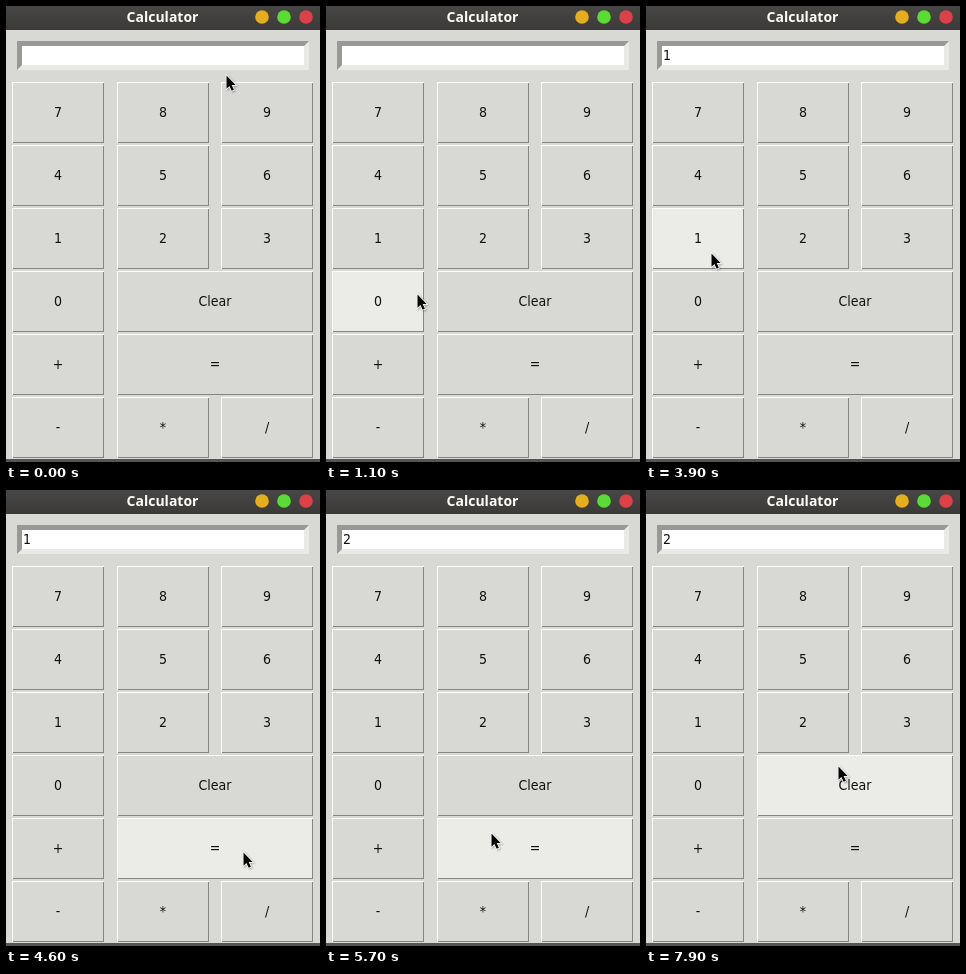
These frames come from a looping animation (314 px wide and 456 px high, 8 s). An HTML page with a canvas:

```html
<!DOCTYPE html>
<html lang="en">
<head>
<meta charset="utf-8">
<title>Calculator</title>
<style>
  html, body { margin: 0; width: 100%; height: 100%; overflow: hidden; background: #d8d8d5; }
  canvas { display: block; }
</style>
</head>
<body>
<canvas id="stage" width="314" height="456"></canvas>
<script>
const ctx = document.getElementById('stage').getContext('2d');
const LOOP = 8000, STEP = 100;
const FACE = '#d8d8d5', ACTIVE = '#ebebe7', LIGHT = '#fdfdfc', SHADE = '#858583', INK = '#111';
const UI_FONT = '14px "DejaVu Sans Condensed", "Noto Sans", sans-serif';

const columns = [6, 111, 215];
const rows = [['7', '8', '9'], ['4', '5', '6'], ['1', '2', '3'], ['0', 'Clear'], ['+', '='], ['-', '*', '/']];
const buttons = rows.flatMap((labels, row) => labels.map((label, col) => ({
  label,
  x: columns[col],
  y: 76 + 63 * row,
  w: labels.length === 2 && col === 1 ? 196 : 92,
  h: 61
})));

// Each move glides the pointer to (x, y); some end with a click that sets the entry.
const home = { x: 220, y: 69 };
const moves = [
  { from: 0, to: 1000, x: 91, y: 288 },
  { from: 1100, to: 1600, x: 55, y: 240, press: 1800, release: 2000, entry: '1' },
  { from: 2100, to: 2500, x: 55, y: 366, press: 2600, release: 2800, entry: '' },
  { from: 2900, to: 3200, x: 55, y: 240, press: 3500, release: 3700, entry: '1' },
  { from: 3800, to: 4500, x: 237, y: 362, press: 4700, release: 4900, entry: '2' },
  { from: 5000, to: 5700, x: 165, y: 343 },
  { from: 5700, to: 6200, x: 57, y: 416, press: 6300, release: 6500, entry: '' },
  { from: 6500, to: 6900, x: 138, y: 226 },
  { from: 6900, to: 7000, x: 102, y: 194 },
  { from: 7000, to: 7300, x: 150, y: 232, press: 7400, release: 7500, entry: '2' },
  { from: 7600, to: 7850, x: 192, y: 276 }
];

function pointerAt(t) {
  let { x, y } = home;
  for (const move of moves) {
    const k = Math.min(1, Math.max(0, (t - move.from) / (move.to - move.from)));
    const eased = k * k * (3 - 2 * k);
    x += (move.x - x) * eased;
    y += (move.y - y) * eased;
  }
  return { x: Math.round(x), y: Math.round(y) };
}

function buttonAt(p) {
  return buttons.find(({ x, y, w, h }) => p.x >= x && p.x < x + w && p.y >= y && p.y < y + h);
}

function rect(color, x, y, w, h) {
  ctx.fillStyle = color;
  ctx.fillRect(x, y, w, h);
}

function trace(points) {
  ctx.beginPath();
  points.forEach(([x, y]) => ctx.lineTo(x, y));
  ctx.closePath();
}

function text(str, x, y, font, color, align) {
  ctx.font = font;
  ctx.textAlign = align;
  ctx.fillStyle = color;
  ctx.fillText(str, x, y);
}

function drawTitleBar() {
  const shade = ctx.createLinearGradient(0, 0, 0, 24);
  shade.addColorStop(0, '#484745');
  shade.addColorStop(1, '#3b3a38');
  rect(shade, 0, 0, 314, 24);
  text('Calculator', 156.5, 16, 'bold 14px "Noto Sans", sans-serif', '#fbfbf8', 'center');
  ['#e5ad20', '#5bdc35', '#da4148'].forEach((color, i) => {
    ctx.fillStyle = color;
    ctx.beginPath();
    ctx.arc(256 + 22 * i, 11, 6.8, 0, 2 * Math.PI);
    ctx.fill();
  });
}

function drawEntry(value) {
  rect('#e9e9e6', 11, 35, 292, 29);
  trace([[11, 35], [303, 35], [298, 40], [16, 40], [16, 59], [11, 64]]);
  ctx.fillStyle = '#989896';
  ctx.fill();
  rect('#fff', 16, 40, 282, 19);
  text(value, 17, 54, UI_FONT, INK, 'left');
}

function drawButton({ label, x, y, w, h }, active, pressed) {
  rect(pressed ? SHADE : LIGHT, x, y, w, h);
  rect(pressed ? LIGHT : SHADE, x + 1, y + 1, w - 1, h - 1);
  rect(active ? ACTIVE : FACE, x + 1, y + 1, w - 2, h - 2);
  const shift = pressed ? 2 : 0;
  text(label, x + w / 2 + shift, y + 35 + shift, UI_FONT, INK, 'center');
}

function drawPointer({ x, y }) {
  ctx.save();
  ctx.translate(x + 0.5, y + 0.5);
  ctx.scale(0.86, 0.88);
  trace([[0, 0], [0, 15], [3.4, 11.8], [6, 17.4], [8.6, 16.2], [6, 10.8], [10.6, 10.8]]);
  ctx.lineWidth = 1.8;
  ctx.strokeStyle = '#fff';
  ctx.shadowColor = 'rgba(0,0,0,.3)';
  ctx.shadowBlur = 2;
  ctx.shadowOffsetX = ctx.shadowOffsetY = 1;
  ctx.stroke();
  ctx.shadowColor = 'transparent';
  ctx.fillStyle = '#050505';
  ctx.fill();
  ctx.restore();
}

function draw(now) {
  const t = Math.floor((now % LOOP) / STEP) * STEP;
  // Highlighting trails the pointer by one step.
  const hovered = buttonAt(pointerAt(t - STEP));
  const pressed = moves.some(m => t >= m.press && t < m.release);
  const lastClick = moves.filter(m => m.release <= t).pop();

  rect(FACE, 0, 0, 314, 456);
  drawTitleBar();
  drawEntry(lastClick ? lastClick.entry : '');
  buttons.forEach(b => drawButton(b, b === hovered, b === hovered && pressed));
  rect('#555553', 0, 453, 314, 3);
  drawPointer(pointerAt(t));
}

const start = performance.now();
function tick() {
  draw(performance.now() - start);
  requestAnimationFrame(tick);
}
tick();
</script>
</body>
</html>
```
